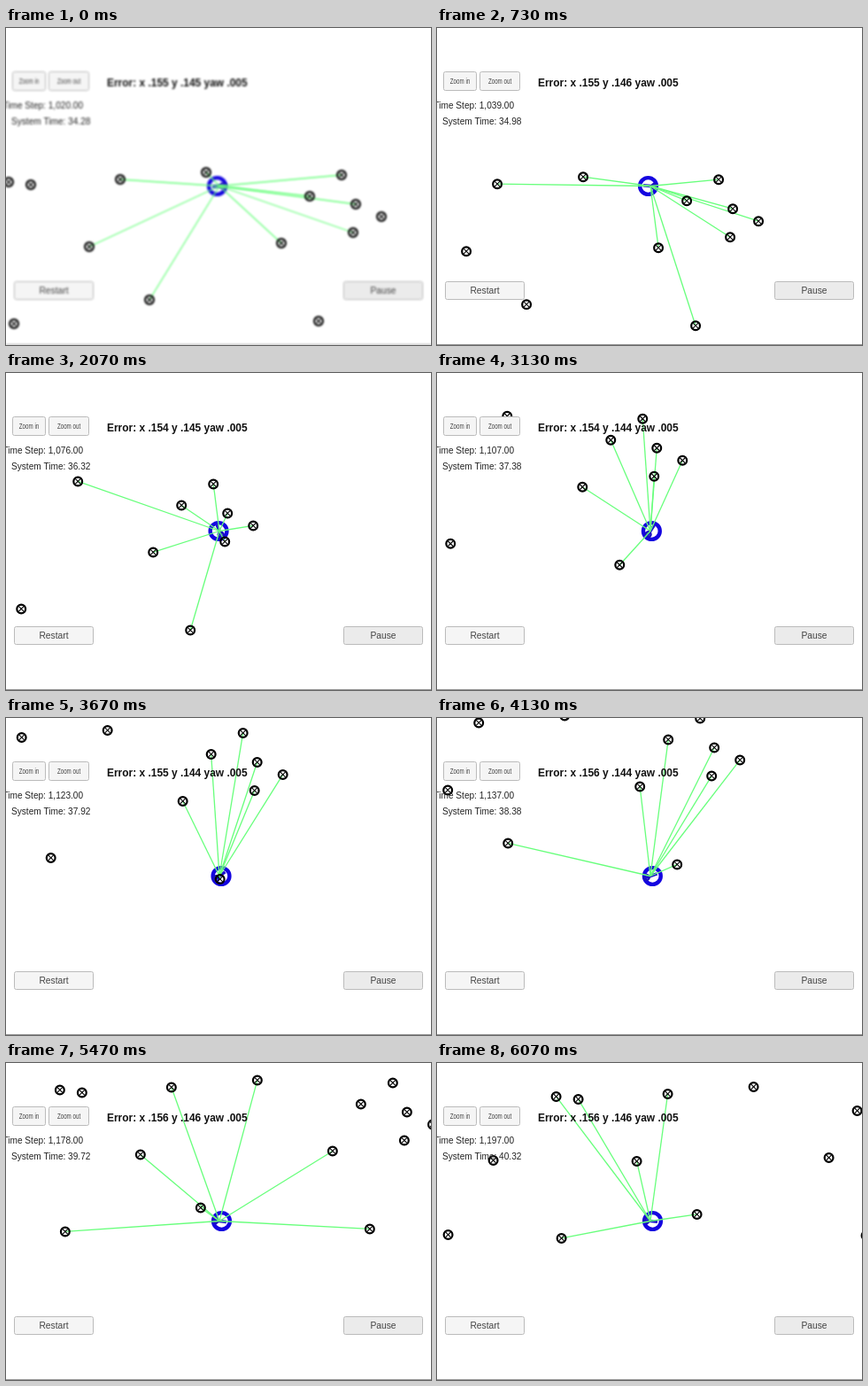
Animation of 480 by 358 pixels, one loop 6140 ms. Source, as an HTML page with a canvas:

```html
<!DOCTYPE html>
<html lang="en">
<head>
<meta charset="utf-8">
<title>Vehicle localisation</title>
<style>
  html, body { margin: 0; width: 100%; height: 100%; overflow: hidden; background: #fff; }
  canvas { display: block; }
</style>
</head>
<body>
<canvas id="stage" width="480" height="358"></canvas>
<script>
const ctx = document.getElementById('stage').getContext('2d');
const LOOP = 6140, TICK = 200 / 3, LAST_TICK = 91, END = 6070;
const SENSOR_RANGE = 179;
const CAR = { x: 241, y: 178.5 };
const SANS = '"Liberation Sans", Arial, sans-serif';

// The map that the vehicle drives through.
const landmarks = [
  [-126, 3], [-101, 6], [0, 0], [97, -8], [250, -5], [214, 19], [266, 28], [295, 42],
  [263, 60], [182, 72], [-35, 76], [33, 136], [-120, 163], [224, 160], [-197, 75], [-248, 159]
];

// Screen positions of the map origin at equal time steps.
const waypoints = [
  [129, 171], [66, 176], [5, 157], [-20, 118], [-21.5, 63.5],
  [26.5, 16], [78, 2], [168, 24.5], [261, 35]
];

// Catmull-Rom spline through the waypoints.
function originAt(t) {
  const last = waypoints.length - 1;
  const pos = Math.min(Math.max(t / END, 0), 1) * last;
  const i = Math.min(Math.floor(pos), last - 1), u = pos - i;
  const at = (j, axis) => {
    if (j < 0) return 2 * waypoints[0][axis] - waypoints[1][axis];
    if (j > last) return 2 * waypoints[last][axis] - waypoints[last - 1][axis];
    return waypoints[j][axis];
  };
  return [0, 1].map(axis => {
    const [a, b, c, d] = [-1, 0, 1, 2].map(k => at(i + k, axis));
    return b + u / 2 * (c - a + u * (2 * a - 5 * b + 4 * c - d + u * (3 * (b - c) + d - a)));
  });
}

function line(x1, y1, x2, y2, color, width) {
  ctx.strokeStyle = color;
  ctx.lineWidth = width;
  ctx.beginPath();
  ctx.moveTo(x1, y1);
  ctx.lineTo(x2, y2);
  ctx.stroke();
}

function ring(x, y, r, color, width) {
  ctx.strokeStyle = color;
  ctx.lineWidth = width;
  ctx.beginPath();
  ctx.arc(x, y, r, 0, 2 * Math.PI);
  ctx.stroke();
}

function text(str, x, y, font, color = '#222', align = 'left') {
  ctx.font = `${font} ${SANS}`;
  ctx.fillStyle = color;
  ctx.textAlign = align;
  ctx.fillText(str, x, y);
}

function button(label, x, y, w, h, fill, size = 10.3, squeeze = 1) {
  ctx.beginPath();
  ctx.roundRect(x + .5, y + .5, w - 1, h - 1, 2);
  ctx.fillStyle = fill;
  ctx.fill();
  ctx.strokeStyle = '#bbb';
  ctx.lineWidth = 1;
  ctx.stroke();
  ctx.save();
  ctx.translate(x + w / 2, y + h / 2 + size * .35);
  ctx.scale(squeeze, 1);
  text(label, 0, 0, size + 'px', '#444', 'center');
  ctx.restore();
}

function drawCar(heading) {
  ring(CAR.x - 2.5 * Math.cos(heading), CAR.y, 9.4, '#1404e0', 4.4);
  ctx.save();
  ctx.translate(CAR.x, CAR.y);
  ctx.rotate(heading);
  line(-8, 0, 8, 0, '#1a10d0', 3.4);
  ring(4.5, 0, 3, '#1a10c0', 2.4);
  ctx.restore();
}

function drawLandmark([x, y]) {
  ring(x, y, 4.9, '#000', 2.2);
  line(x - 3, y - 3, x + 3, y + 3, '#000', 1.1);
  line(x - 3, y + 3, x + 3, y - 3, '#000', 1.1);
}

function drawInterface(t) {
  const s = Math.max(0, t / 1000 - .03);
  const step = Math.round(1020 + 26.9 * s + .4 * s * s).toLocaleString('en-US');
  const clock = (34.28 + Math.round(s * 50) / 50).toFixed(2);
  const errorX = 155 - Math.round(1.3 * Math.sin(.95 * s - .33));
  const errorY = 145 + Math.round(Math.cos(1.366 * (s - 5.8)));

  button('Zoom in', 7, 49, 38, 22, '#f5f5f5', 8.5, .73);
  button('Zoom out', 48, 49, 46, 22, '#f5f5f5', 8.5, .73);
  button('Restart', 9, 286, 90, 21, '#f5f5f5');
  button('Pause', 381, 286, 90, 21, '#ebebeb');
  text(`Error: x .${errorX} y .${errorY} yaw .005`, 114, 66, 'bold 11.95px', '#111');
  text(`Time Step: ${step}.00`, -3.5, 91.3, '10.1px');
  text(`System Time: ${clock}`, 6, 109, '10.1px');
  ctx.fillStyle = '#999';
  ctx.fillRect(0, 357, 480, 1);
}

function draw(now) {
  const tick = Math.min(LAST_TICK, Math.floor((now % LOOP + 5) / TICK));
  const t = tick * TICK;
  const [ox, oy] = originAt(t);
  const [px, py] = originAt(t - 30), [nx, ny] = originAt(t + 30);
  const points = landmarks.map(([x, y]) => [x + ox, y + oy]);

  ctx.filter = 'none';
  ctx.fillStyle = '#fff';
  ctx.fillRect(0, 0, 480, 358);
  // The picture starts soft and sharpens over the first few ticks.
  const blur = 1.2 - tick * .3;
  if (blur > .05) ctx.filter = `blur(${blur}px)`;

  drawCar(Math.atan2(py - ny, px - nx));
  for (const [x, y] of points) {
    if (Math.hypot(x - CAR.x, y - CAR.y) < SENSOR_RANGE) line(CAR.x, CAR.y, x, y, '#68ff7c', 1.3);
  }
  points.forEach(drawLandmark);
  drawInterface(t);
}

const start = performance.now();
function frame() {
  draw(performance.now() - start);
  requestAnimationFrame(frame);
}
frame();
</script>
</body>
</html>
```
